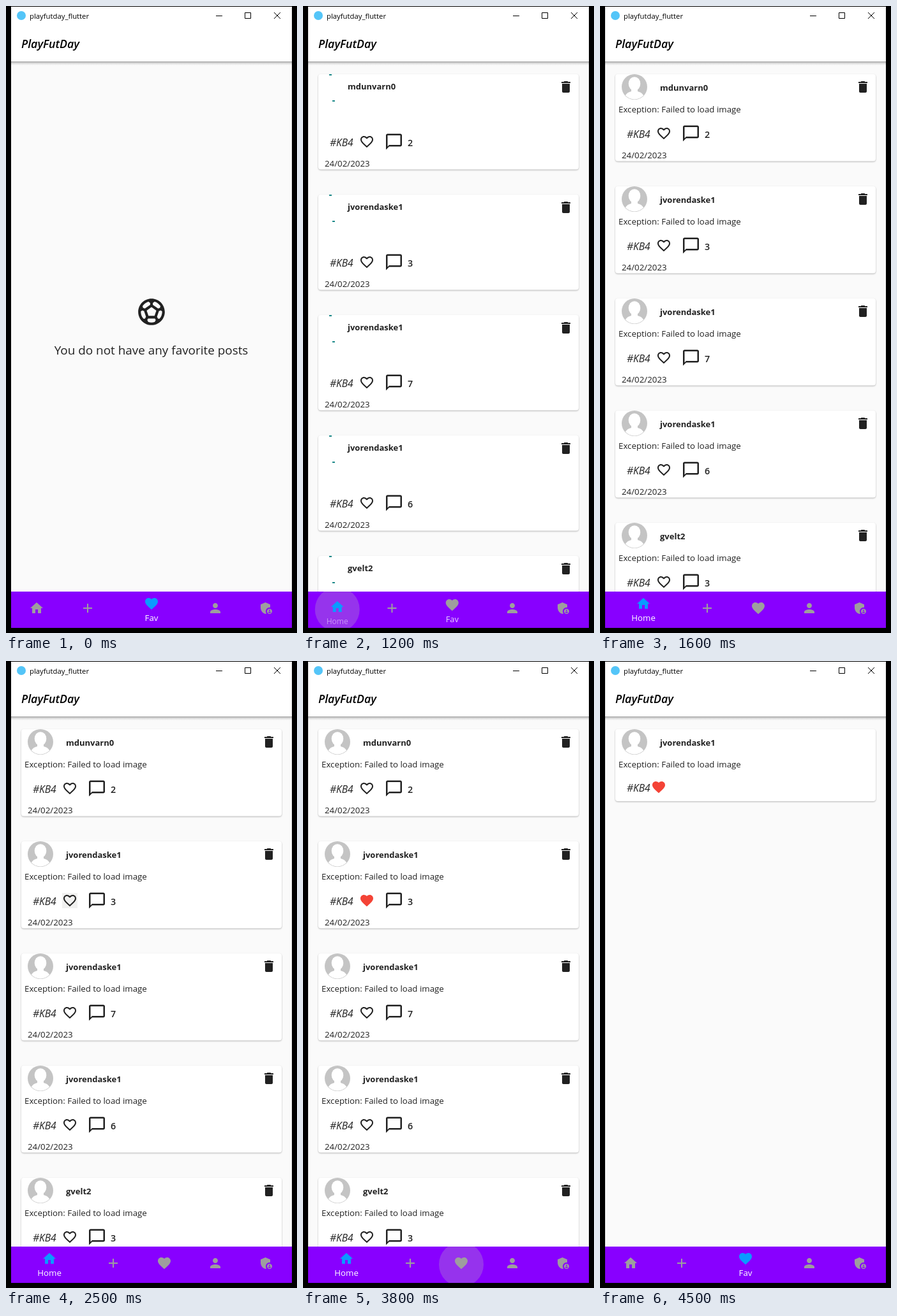
Write an HTML page that moves like this. It is 456 px wide and 984 px high and loops after 6.1 s.

```html
<!DOCTYPE html>
<html lang="en">
<head>
<meta charset="utf-8">
<title>PlayFutDay</title>
<style>
html, body { margin: 0; width: 100%; height: 100%; overflow: hidden; background: #000; }
svg { display: block; width: 100vw; height: 100vh; font-family: "Open Sans", "Noto Sans", sans-serif; fill: #212121; }
.card { fill: #fff; filter: drop-shadow(0 1px 1px rgba(0,0,0,.28)); }
.name { font-size: 13px; font-weight: 700; }
.body { font-size: 13.3px; }
.tag { font-size: 15.6px; font-style: italic; }
.count { font-size: 14.3px; font-weight: 600; }
.label { font-size: 13.3px; fill: #fff; text-anchor: middle; }
</style>
</head>
<body>
<svg id="stage" viewBox="0 0 456 984">
  <defs>
    <linearGradient id="shade" x2="0" y2="1">
      <stop offset="0" stop-opacity=".36"/>
      <stop offset=".45" stop-opacity=".13"/>
      <stop offset="1" stop-opacity="0"/>
    </linearGradient>
    <clipPath id="pageClip"><rect x="8" y="87" width="440" height="832"/></clipPath>
    <clipPath id="navClip"><rect x="8" y="919" width="440" height="57"/></clipPath>
    <clipPath id="faceClip"><circle r="19.5"/></clipPath>
  </defs>
  <rect width="456" height="984" fill="#000"/>
  <rect x="8" y="1" width="440" height="975" fill="#fafafa"/>
  <g id="pages" clip-path="url(#pageClip)"></g>
  <rect x="8" y="87" width="440" height="6" fill="url(#shade)"/>
  <rect x="8" y="1" width="440" height="86" fill="#fff"/>
  <circle cx="24" cy="15" r="7" fill="#54c5f8"/>
  <text x="37" y="20" font-size="11.3" fill="#000">playfutday_flutter</text>
  <path d="M329 15.5h10M374.5 10.5h9v9h-9zM420 10l10 10M430 10l-10 10" fill="none" stroke="#000"/>
  <text x="24" y="66" font-size="17.8" font-weight="600" font-style="italic" fill="#000">PlayFutDay</text>
  <rect x="8" y="919" width="440" height="57" fill="#80f"/>
  <g id="nav" clip-path="url(#navClip)"></g>
</svg>
<script>
const LOOP = 6100, STEP = 100;
const GREY = '#9e9e9e', BLUE = '#0a9bff', RED = '#f44336', INK = '#212121';

const ICONS = {
  home: 'M10 20v-6h4v6h5v-8h3L12 3 2 12h3v8z',
  add: 'M19 13h-6v6h-2v-6H5v-2h6V5h2v6h6v2z',
  heart: 'M12 21.35l-1.45-1.32C5.4 15.36 2 12.28 2 8.5 2 5.42 4.42 3 7.5 3c1.74 0 3.41.81 4.5 2.09C13.09 3.81 14.76 3 16.5 3 19.58 3 22 5.42 22 8.5c0 3.78-3.4 6.86-8.55 11.54L12 21.35z',
  heartLine: 'M16.5 3c-1.74 0-3.41.81-4.5 2.09C10.91 3.81 9.24 3 7.5 3 4.42 3 2 5.42 2 8.5c0 3.78 3.4 6.86 8.55 11.54L12 21.35l1.45-1.32C18.6 15.36 22 12.28 22 8.5 22 5.42 19.58 3 16.5 3zm-4.4 15.55l-.1.1-.1-.1C7.14 14.24 4 11.39 4 8.5 4 6.5 5.5 5 7.5 5c1.54 0 3.04.99 3.57 2.36h1.87C13.46 5.99 14.96 5 16.5 5c2 0 3.5 1.5 3.5 3.5 0 2.89-3.14 5.74-7.9 10.05z',
  person: 'M12 12c2.21 0 4-1.79 4-4s-1.79-4-4-4-4 1.79-4 4 1.79 4 4 4zm0 2c-2.67 0-8 1.34-8 4v2h16v-2c0-2.66-5.33-4-8-4z',
  admin: 'M17 11c.34 0 .67.04 1 .09V6.27L10.5 3 3 6.27v4.91c0 4.54 3.2 8.79 7.5 9.82.55-.13 1.08-.32 1.6-.55C11.41 19.47 11 18.28 11 17c0-3.31 2.69-6 6-6zM17 13c-2.21 0-4 1.79-4 4s1.79 4 4 4 4-1.79 4-4-1.79-4-4-4zm0 1.38c.62 0 1.12.51 1.12 1.12s-.51 1.12-1.12 1.12-1.12-.51-1.12-1.12.5-1.12 1.12-1.12zm0 5.37c-.93 0-1.74-.46-2.24-1.17.05-.72 1.51-1.08 2.24-1.08s2.19.36 2.24 1.08c-.5.71-1.31 1.17-2.24 1.17z',
  bin: 'M6 19c0 1.1.9 2 2 2h8c1.1 0 2-.9 2-2V7H6v12zM19 4h-3.5l-1-1h-5l-1 1H5v2h14V4z',
  chat: 'M20 2H4c-1.1 0-2 .9-2 2v18l4-4h14c1.1 0 2-.9 2-2V4c0-1.1-.9-2-2-2zm0 14H6l-2 2V4h16v12z',
  ball: 'M12 2C6.48 2 2 6.48 2 12s4.48 10 10 10 10-4.48 10-10S17.52 2 12 2zm1 3.3l1.35-.95c1.82.56 3.37 1.76 4.38 3.34l-.39 1.34-1.35.46L13 6.7V5.3zm-3.35-.95L11 5.3v1.4L7.01 9.49l-1.35-.46-.39-1.34c1.01-1.57 2.56-2.77 4.38-3.34zM7.08 17.11l-1.14.1C4.73 15.81 4 13.99 4 12c0-.12.01-.23.02-.35l1-.73L6.4 11.4l1.46 4.34-.78 1.37zm7.42 2.48c-.79.26-1.63.41-2.5.41s-1.71-.15-2.5-.41l-.69-1.49.64-1.1h5.11l.64 1.11-.7 1.48zM14.27 15H9.73l-1.35-4.02L12 8.44l3.63 2.54L14.27 15zm3.79 2.21l-1.14-.1-.79-1.37 1.46-4.34 1.39-.47 1 .73c.01.11.02.22.02.34 0 1.99-.73 3.81-1.94 5.21z'
};

const $ = id => document.getElementById(id);
const set = (el, attrs) => { for (const k in attrs) el.setAttribute(k, attrs[k]); };
const place = (x, y, size = 24) => `translate(${x - size / 2} ${y - size / 2}) scale(${size / 24})`;
const icon = (name, x, y, size, fill = INK, extra = '') =>
  `<path d="${ICONS[name]}" transform="${place(x, y, size)}" fill="${fill}" ${extra}/>`;
const text = (cls, x, y, s) => `<text class="${cls}" x="${x}" y="${y}">${s}</text>`;
const card = h => `<rect class="card" x="24" y="107" width="408" height="${h}" rx="4"/>`;

const avatar = `<g transform="translate(54 127)"><circle r="20" fill="#c4c4c4"/>
  <g clip-path="url(#faceClip)" fill="#fff"><ellipse cy="-5" rx="9.3" ry="10.8"/>
  <path d="M-5 2H5V7C11 9 15 11 16 20H-16C-15 11-11 9-5 7z"/></g></g>`;
const spinners = '<path d="M41 108h4M46 149h4" stroke="#1f8a8a" stroke-width="2"/>';

function head(user, loading) {
  return loading
    ? spinners + text('name', 70, 131, user)
    : avatar + text('name', 94, 133, user) + text('body', 29, 167, 'Exception: Failed to load image');
}

// A loading image holds 13px more than the error line.
function post([user, count], i, loading) {
  const dy = loading ? 13 : 0;
  const liked = i === 1 && !loading;
  const hot = liked ? '<rect id="hover" x="88" y="188" width="24" height="24" fill="#3a3a30"/>' : '';
  return `<g transform="translate(0 ${i * (176 + dy)})">${card(136.5 + dy)}${head(user, loading)}
    ${icon('bin', 412, 127)}<g transform="translate(0 ${dy})">${text('tag', 42, 207, '#KB4')}${hot}
    ${icon('heartLine', 100, 200, 24, INK, liked ? 'id="like"' : '')}
    ${icon('chat', 142.5, 200, 30)}${text('count', 164, 207, count)}
    ${text('body', 34, 239, '24/02/2023')}</g></g>`;
}

function favorite(loading) {
  const dy = loading ? 13 : 0;
  return card(113 + dy) + head('jvorendaske1', loading) +
    text('tag', 42, 205 + dy, '#KB4') + icon('heart', 92, 198 + dy, 24, RED);
}

const posts = [['mdunvarn0', 2], ['jvorendaske1', 3], ['jvorendaske1', 7], ['jvorendaske1', 6], ['gvelt2', 3]];
const list = loading => posts.map((p, i) => post(p, i, loading)).join('');
const pages = {
  empty: icon('ball', 228, 480, 50) +
    '<text x="227.5" y="547" font-size="18.9" text-anchor="middle">You do not have any favorite posts</text>',
  listLoading: list(true),
  list: list(false),
  favLoading: favorite(true),
  fav: favorite(false)
};
$('pages').innerHTML = Object.keys(pages).map(k => `<g id="${k}">${pages[k]}</g>`).join('');

const tabs = ['home', 'add', 'heart', 'person', 'admin'];
const HOME = 0, FAV = 2;
$('nav').innerHTML = '<circle id="ripple" cy="947" r="35" fill="#bbb"/>' +
  tabs.map((n, i) => icon(n, 0, 0, 24, GREY, `id="tab${i}"`)).join('') +
  '<text class="label" id="label0">Home</text><text class="label" id="label2">Fav</text>';

// Flutter's fastOutSlowIn curve, cubic-bezier(.4, 0, .2, 1).
function ease(x) {
  if (x <= 0) return 0;
  if (x >= 1) return 1;
  let lo = 0, hi = 1, u;
  for (let i = 0; i < 24; i++) {
    u = (lo + hi) / 2;
    const bx = 1.2 * u * (1 - u) ** 2 + .6 * u * u * (1 - u) + u ** 3;
    if (bx < x) lo = u; else hi = u;
  }
  return 3 * u * u * (1 - u) + u ** 3;
}

const pageAt = t => t < 1200 ? 'empty' : t < 1300 ? 'listLoading' : t < 3900 ? 'list' : t < 4000 ? 'favLoading' : 'fav';
const stepValue = (t, start, values) => values[(t - start) / STEP] || 0;

function drawNav(t) {
  const toHome = ease((t - 1146) / 200), toFav = ease((t - 3846) / 200);
  const home = toHome - toFav;
  const open = [home, 0, 1 - home, 0, 0];
  const active = t >= 1200 && t < 3900 ? HOME : FAV;
  const centers = [];
  let left = 8;
  tabs.forEach((_, i) => {
    const p = open[i], w = 80 + 40 * p, x = left + w / 2;
    left += w;
    centers.push(x);
    set($('tab' + i), { transform: place(x, 945 - 7 * p), fill: i === active ? BLUE : GREY });
    const label = $('label' + i);
    if (label) set(label, {
      transform: `translate(${x} ${965 + 6.7 * (1 - p)}) scale(${.87 + .13 * p})`,
      opacity: p ** .6
    });
  });
  const first = t < 2000;
  set($('ripple'), {
    cx: centers[first ? HOME : FAV],
    opacity: first ? stepValue(t, 1100, [.1, .28, .08, .05, .02]) : stepValue(t, 3800, [.27, .5, .18])
  });
}

function draw(ms) {
  const t = Math.floor(ms % LOOP / STEP) * STEP;
  const page = pageAt(t);
  for (const k in pages) $(k).style.display = k === page ? '' : 'none';
  const liked = t >= 2700;
  set($('like'), { d: liked ? ICONS.heart : ICONS.heartLine, fill: liked ? RED : INK });
  set($('hover'), { opacity: stepValue(t, 2500, [.07, .1, .08, .04]) });
  drawNav(t);
}

const start = performance.now();
function tick() {
  draw(performance.now() - start);
  requestAnimationFrame(tick);
}
tick();
</script>
</body>
</html>
```
